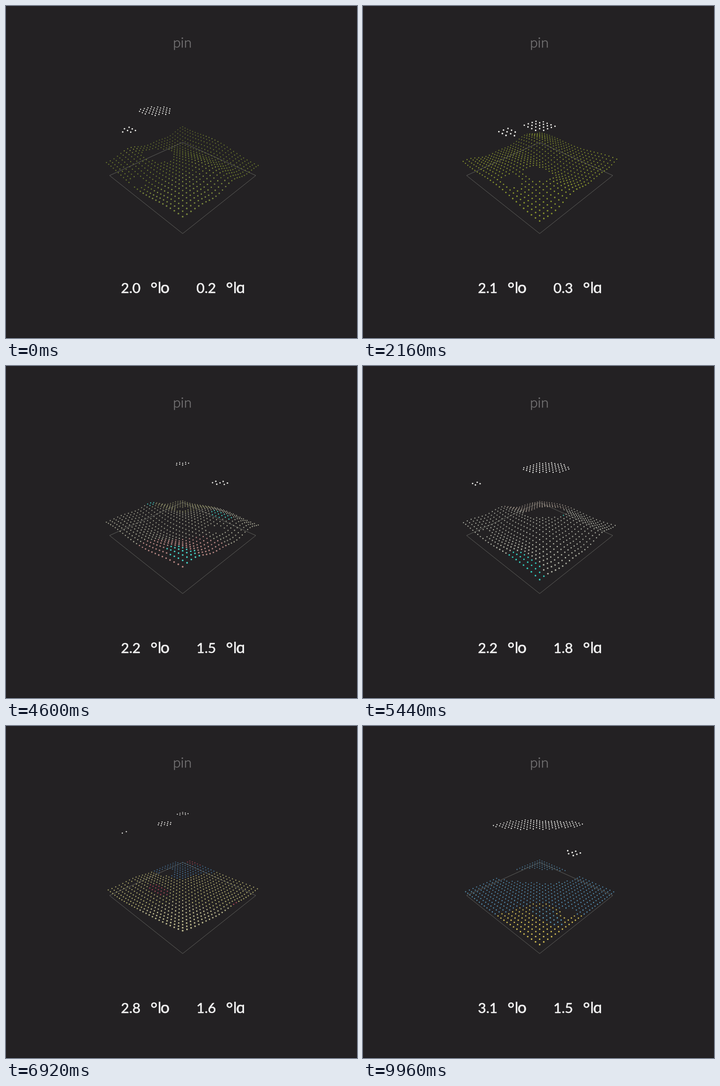
Write an HTML page with a canvas that moves like this. It is 600 by 568 pixels and loops after 10000 ms.

```html
<!DOCTYPE html>
<html lang="en">
<head>
<meta charset="utf-8">
<title>pin</title>
<style>
  html, body { margin: 0; width: 100%; height: 100%; overflow: hidden; background: #232123; }
  canvas { display: block; }
</style>
</head>
<body>
<canvas id="stage" width="600" height="568"></canvas>
<script>
const ctx = document.getElementById('stage').getContext('2d');
const LOOP = 10000, GRID = 25, CLOUD_HEIGHT = 0.83, PUFFS = 4;
const WHITE = '#f4f4f0', INK = '#f6f6f6';

// Ground coordinates: l runs right, s runs toward the viewer, |l| + |s| <= 1.
// cloud: centre l, s and its two radii; palette: back, middle, front, peaks
const keys = [
  { at: 0, lo: 2.0, la: 0.2, front: 0.21, cloud: [-0.32, -0.21, 0.2, 0.18],
    palette: ['#66732c', '#69772d', '#7d8b3e', '#7f8c38'] },
  { at: 2160, lo: 2.1, la: 0.3, front: 0.22, cloud: [0, 0.28, 0.17, 0.13],
    palette: ['#7c8a2c', '#85922e', '#8b982f', '#8f9c30'] },
  { at: 3280, lo: 2.2, la: 0.7, front: 0.26, cloud: [0.53, 0.3, 0.24, 0.2],
    palette: ['#6f8a3c', '#7b9440', '#849c40', '#a8b81c'] },
  { at: 4600, lo: 2.2, la: 1.5, front: 0.33, cloud: [0.4, 0.19, 0.09, 0.06],
    palette: ['#90906a', '#a0a08e', '#b88884', '#48d8cc'] },
  { at: 5440, lo: 2.2, la: 1.8, front: 0.15, cloud: [0.07, -0.32, 0.29, 0.22],
    palette: ['#a89c90', '#aaaca0', '#b4b6a8', '#34cdbe'] },
  { at: 6920, lo: 2.8, la: 1.6, front: 0.32, cloud: [0, -0.95, 0.13, 0.1],
    palette: ['#4a7ca6', '#b4b070', '#c0bc90', '#b04a5c'] },
  { at: 9960, lo: 3.1, la: 1.5, front: 0.13, cloud: [-0.06, -0.44, 0.58, 0.2],
    palette: ['#5590b4', '#5590b4', '#d2be54', '#5c9cbc'] }
];

const clamp = v => Math.max(0, Math.min(1, v));
const lerp = (a, b, u) => a + (b - a) * u;
const ease = u => u * u * (3 - 2 * u);
const channels = hex => [1, 3, 5].map(i => parseInt(hex.slice(i, i + 2), 16));
const mix = (a, b, u) => {
  const end = channels(b);
  return `rgb(${channels(a).map((c, i) => Math.round(lerp(c, end[i], u)))})`;
};

function project(l, s, h) {
  const z = 2.976 - 0.816 * s - 0.577 * h;
  return { x: 302 + 372 * l / z, y: 290 + 372 * (0.577 * s - 0.816 * h) / z, z };
}

// Drifting waves at three scales, within -1..1.
function ripple(l, s, t) {
  return (Math.sin(5 * l + 2 * s + 1.3 * t)
        + Math.sin(6 * s - 3 * l - 0.9 * t + 1)
        + 0.6 * Math.sin(9 * l - 8 * s + 1.7 * t)) / 2.6;
}

// The land starts hilly and settles into a nearly flat plane.
function landAt(t, front) {
  const calm = ease(clamp((t - 5) / 3));
  return {
    front,
    side: lerp(0.21, 0.06, calm),
    back: lerp(0.27, 0.05, ease(clamp(t / 5.4))),
    rough: lerp(0.075, 0.004, calm)
  };
}

function band(l, s, wave) {
  if (wave > 0.66) return 3;
  if (Math.abs(s) - 0.4 * Math.abs(l) + 0.1 * wave < 0.28) return 1;
  return s < 0 ? 0 : 2;
}

function puffsAt(t) {
  return Array.from({ length: PUFFS }, (_, n) => {
    const angle = n * 2.4 + 0.5 * t;
    const r = 0.1 * Math.max(0, Math.sin(1.3 * t + n * 1.7));
    return [0.75 * Math.cos(angle), 0.5 * Math.sin(angle), r, r];
  });
}

const inside = ([cl, cs, rl, rs], l, s, wave) =>
  Math.hypot((l - cl) / rl, (s - cs) / rs) < 1 + 0.15 * wave;

function dot(p, size, color) {
  ctx.fillStyle = color;
  ctx.beginPath();
  ctx.arc(p.x, p.y, size / p.z, 0, Math.PI * 2);
  ctx.fill();
}

function drawOutline() {
  ctx.strokeStyle = '#555552';
  ctx.lineWidth = 1;
  ctx.beginPath();
  for (const [l, s] of [[-1, 0], [0, -1], [1, 0], [0, 1]]) {
    const p = project(l, s, 0);
    ctx.lineTo(p.x, p.y);
  }
  ctx.closePath();
  ctx.stroke();
}

function drawPoints(t, land, clouds, colors) {
  for (let i = 0; i <= GRID; i++) {
    for (let j = 0; j <= GRID; j++) {
      const l = (i - j) / GRID, s = (i + j) / GRID - 1;
      const wave = ripple(l, s, t);
      if (clouds.some(c => inside(c, l, s, wave))) {
        dot(project(l, s, CLOUD_HEIGHT + 0.015 * wave), 2.8, WHITE);
      } else {
        const end = s < 0 ? land.back : land.front;
        const h = lerp(land.side, end, s * s) + land.rough * wave;
        dot(project(l, s, h), 2.9, colors[band(l, s, wave)]);
      }
    }
  }
}

function text(str, x, y, font, color, align, weight = 0.5) {
  ctx.font = `${font} Lato, "Noto Sans", sans-serif`;
  ctx.textAlign = align;
  ctx.fillStyle = ctx.strokeStyle = color;
  ctx.lineWidth = weight;
  ctx.lineJoin = 'round';
  ctx.fillText(str, x, y);
  ctx.strokeText(str, x, y);
}

function drawReadout(value, right, letter) {
  text(value.toFixed(1), right, 491, '24px', INK, 'right');
  text('°', right + 23, 494, '29px', INK, 'center');
  text('l', right + 32.5, 491, '25px', INK, 'center');
  text(letter, right + 42, 491, '27px', INK, 'center');
}

function render(ms) {
  const next = Math.max(1, keys.findIndex(k => k.at > ms));
  const to = ms >= keys.at(-1).at ? keys.at(-1) : keys[next];
  const from = keys[keys.indexOf(to) - 1];
  const raw = clamp((ms - from.at) / (to.at - from.at));
  const u = ease(raw), t = ms / 1000;
  const cloud = from.cloud.map((v, i) => lerp(v, to.cloud[i], u));
  const colors = from.palette.map((c, i) => mix(c, to.palette[i], u));

  ctx.fillStyle = '#232123';
  ctx.fillRect(0, 0, 600, 568);
  ctx.fillStyle = '#1b1a1b';
  ctx.fillRect(0, 567, 600, 1);

  text('pin', 301.5, 71, '300 24px', '#7d7c7d', 'center', 0.3);
  drawOutline();
  drawPoints(t, landAt(t, lerp(from.front, to.front, u)), [cloud, ...puffsAt(t)], colors);
  drawReadout(lerp(from.lo, to.lo, raw), 230, 'o');
  drawReadout(lerp(from.la, to.la, raw), 359, 'ɑ');
}

const start = performance.now();
function tick() {
  render((performance.now() - start) % LOOP);
  requestAnimationFrame(tick);
}
tick();
</script>
</body>
</html>
```
